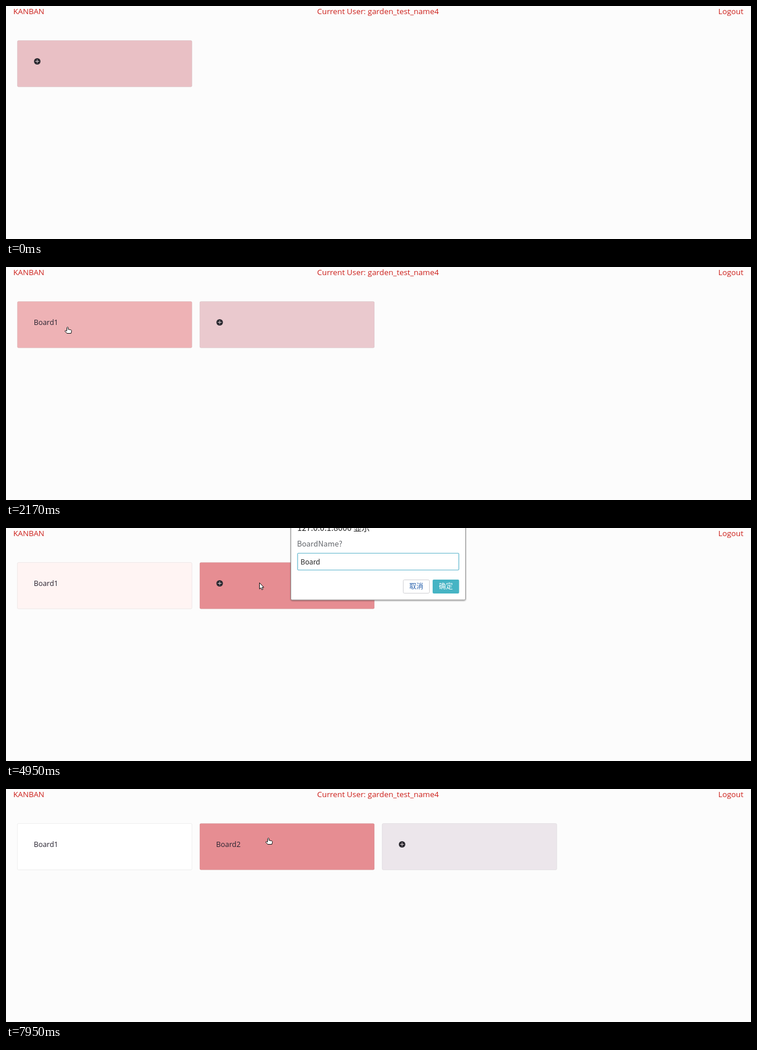
These frames come from a looping animation (1280x402 px, 7.99 s). An HTML page:

```html
<!DOCTYPE html>
<html lang="en">
<head>
<meta charset="utf-8">
<title>Kanban boards</title>
<style>
  html, body { margin: 0; width: 100%; height: 100%; overflow: hidden; background: #fcfcfc; }
  svg { display: block; width: 1280px; height: 402px; }
  text { white-space: pre; }
  .nav { font: 13.33px "Open Sans", sans-serif; fill: #cc1f1a; }
  .name { font: 12.4px "Open Sans", sans-serif; fill: #26222f; }
  .dialog text { font: 12px "Noto Sans CJK SC", "Noto Sans CJK", sans-serif; fill: #222; }
  .dialog .title { font-size: 14px; }
  .dialog .label { font-size: 12.9px; fill: #63666b; }
  .dialog .cancel { fill: #2a62ad; }
  .dialog .ok { fill: #fff; }
</style>
</head>
<body>
<svg viewBox="0 0 1280 402">
  <defs>
    <filter id="shadow" x="-5%" y="-10%" width="110%" height="120%">
      <feDropShadow dx="0" dy="1" stdDeviation="1.1" flood-opacity=".45"/>
    </filter>
  </defs>
  <rect width="1280" height="402" fill="#fcfcfc"/>
  <g class="nav">
    <text x="12.4" y="14">KANBAN</text>
    <text x="534.6" y="14">Current User: garden_test_name4</text>
    <text x="1267" y="14" text-anchor="end">Logout</text>
  </g>
  <g id="cards"></g>
  <g class="dialog" id="dialog">
    <rect x="489.5" y="-30" width="300" height="154" rx="2" fill="#fff" stroke="#999" filter="url(#shadow)"/>
    <text class="title" x="500.5" y="4.5">127.0.0.1:8000 显示</text>
    <text class="label" x="500" y="31.5">BoardName?</text>
    <rect x="501" y="43.5" width="277" height="29" rx="1.5" fill="#fff" stroke="#5fb6cd" stroke-width="1.2"/>
    <text id="typed" x="506" y="63"></text>
    <rect id="caret" y="49" width="1" height="18" fill="#222"/>
    <rect x="682.5" y="89.5" width="45" height="23" rx="2" fill="#fff" stroke="#d0d0d4"/>
    <text class="cancel" x="705" y="105.3" text-anchor="middle">取消</text>
    <rect x="733" y="89" width="45.5" height="24" rx="2" fill="#46b4c4"/>
    <text class="ok" x="755.8" y="105.3" text-anchor="middle">确定</text>
  </g>
  <circle id="ring" fill="none" stroke="#5b9aa2" stroke-width="1.2"/>
  <g id="pointer" fill="#fff" stroke="#111" stroke-linejoin="round">
    <path id="arrow" d="M.5 .5V11.2L3 9L4.6 12.6L6.5 11.7L5 8.3H8Z"/>
    <path id="hand" d="M-1.5 6.5V1.5Q-.5 -.2 .8 1.2V4.5L5.5 5.5Q7 6 6.7 7.6L5.8 11.5H-1L-4.6 8.2Q-4.8 6.6 -3.2 6.6L-1.5 7.6Z"/>
  </g>
</svg>
<script>
const LOOP = 7990, SLOT = 313.4;
const RED = [230, 141, 146], BASE = [236, 230, 235], WHITE = [255, 255, 255], BLUSH = [255, 244, 243];

// Page changes when a board is added
const ADDED = [2068, 7170];
// slot, start, from, to
const FADES = [
  [0, -66, BASE, RED], [0, ADDED[0], WHITE, RED], [0, 2690, RED, BLUSH], [0, 7130, WHITE, WHITE],
  [1, ADDED[0], RED, BASE], [1, 2730, BASE, RED], [1, ADDED[1], WHITE, RED],
  [2, ADDED[1], RED, BASE]
];
const FADE_MS = 260;
const PROMPTS = [
  { open: 330, close: 1980, text: "Board1", keys: [1070, 1280, 1350, 1500, 1690, 1890] },
  { open: 2950, close: 7100, text: "Board2", keys: [3830, 3950, 4070, 4260, 4460, 6830] }
];
const CARET = [[330, 770], [1070, 1980], [2950, 3390], [3830, 4950], [5450, 5940], [6440, 7100]];
const CLICKS = [[340, 540, 105, 103], [2940, 3190, 435.5, 95]];
// start, end, from, to
const MOVES = [[2500, 2880, [106, 103], [435, 94]], [7830, 7950, [435, 94], [451, 84]]];

const $ = id => document.getElementById(id);
const clamp = v => Math.min(1, Math.max(0, v));
const show = (el, on) => el.setAttribute("visibility", on ? "visible" : "hidden");
const set = (el, attrs) => { for (const k in attrs) el.setAttribute(k, attrs[k]); };
const mix = (a, b, p) => a.map((v, i) => v + (b[i] - v) * p);

// The CSS "ease" curve
function ease(x) {
  let lo = 0, hi = 1, s = .5;
  for (let i = 0; i < 18; i++) {
    s = (lo + hi) / 2;
    if (.75 * s * (1 - s) + s ** 3 < x) lo = s; else hi = s;
  }
  return .3 * s * (1 - s) ** 2 + 3 * s * s * (1 - s) + s ** 3;
}

$("cards").innerHTML = [0, 1, 2].map(i => `
  <g transform="translate(${i * SLOT} 0)">
    <rect x="19.5" y="59.5" width="300" height="80" rx="2" stroke="#000" stroke-opacity=".06"/>
    <text class="name" x="47.7" y="100">Board${i + 1}</text>
    <g><circle cx="53.7" cy="95.5" r="5.6" fill="#2b2930"/>
      <path d="M50.5 95.5h6.4M53.7 92.3v6.4" stroke="#d8ccd0"/></g>
  </g>`).join("");
const cards = [...$("cards").children];

function drawCards(t) {
  const boards = ADDED.filter(a => t >= a).length;
  cards.forEach((card, i) => {
    const [box, name, plus] = card.children;
    card.style.display = i <= boards ? "" : "none";
    show(name, i < boards);
    show(plus, i === boards);
    const fade = FADES.filter(f => f[0] === i && t >= f[1]).pop();
    if (!fade) return;
    const rgb = mix(fade[2], fade[3], ease(clamp((t - fade[1]) / FADE_MS)));
    set(box, { fill: `rgb(${rgb.map(Math.round)})` });
  });
}

function drawDialog(t) {
  const prompt = PROMPTS.find(p => t >= p.open && t < p.close + 160);
  $("dialog").style.display = prompt ? "" : "none";
  if (!prompt) return;
  const enter = clamp((t - prompt.open) / 200), leave = clamp((t - prompt.close) / 160);
  const dy = Math.round(-10 * (1 - ease(enter)) - 16 * leave ** 2);
  set($("dialog"), {
    transform: `translate(0 ${dy})`,
    opacity: ease(clamp(enter * 1.6)) * (1 - leave ** 3)
  });
  const typed = $("typed");
  typed.textContent = prompt.text.slice(0, prompt.keys.filter(k => t >= k).length);
  set($("caret"), { x: Math.round(506 + typed.getComputedTextLength() - .4) });
  show($("caret"), CARET.some(([on, off]) => t >= on && t < off));
}

function drawPointer(t) {
  let pos = MOVES[0][2];
  for (const [a, b, from, to] of MOVES) {
    const p = clamp((t - a) / (b - a));
    if (t >= a) pos = mix(from, to, p * p * (3 - 2 * p));
  }
  const modal = t >= 2950 && t < ADDED[1], seen = t >= ADDED[0];
  set($("pointer"), { transform: `translate(${pos.map(Math.round)})` });
  show($("arrow"), seen && modal);
  show($("hand"), seen && !modal);

  const click = CLICKS.find(c => t >= c[0] && t < c[1]);
  show($("ring"), click);
  if (!click) return;
  const p = (t - click[0]) / (click[1] - click[0]);
  set($("ring"), { cx: click[2], cy: click[3], r: 8 * (1 - (1 - p) ** 3), opacity: clamp(2.4 * (1 - p)) });
}

const begin = performance.now();
function frame() {
  const t = (performance.now() - begin) % LOOP;
  drawCards(t);
  drawDialog(t);
  drawPointer(t);
  requestAnimationFrame(frame);
}
frame();
</script>
</body>
</html>
```
